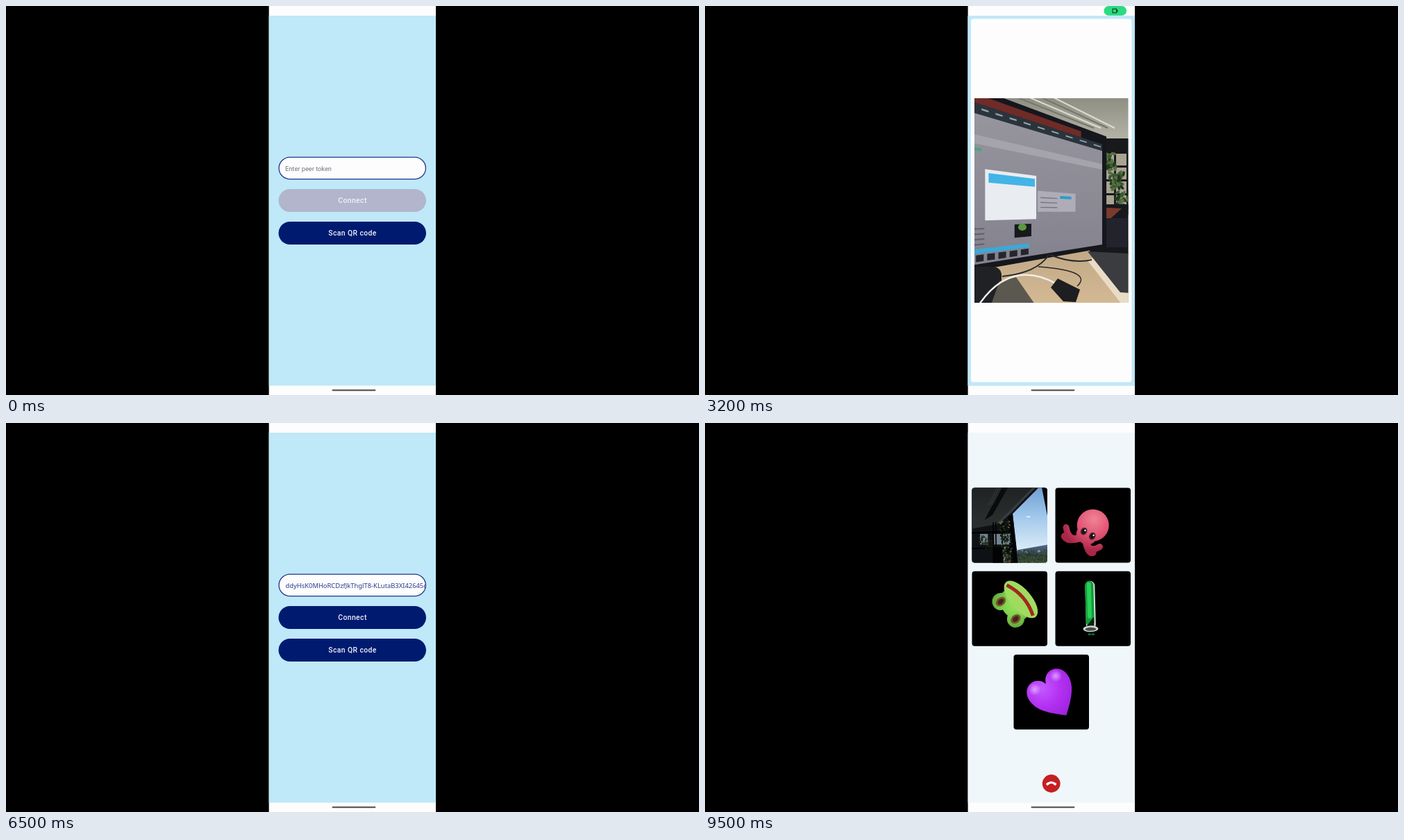
An HTML page with a canvas that plays this animation: 998x561 px, repeating every 9600 ms.

```html
<!DOCTYPE html>
<html lang="en">
<head>
<meta charset="utf-8">
<title>Peer call</title>
<style>
  html, body { margin: 0; width: 100%; height: 100%; overflow: hidden; background: #000; }
  canvas { display: block; }
</style>
</head>
<body>
<canvas id="stage" width="998" height="561"></canvas>
<script>
const c = document.getElementById('stage').getContext('2d');
const LOOP = 9600, LEFT = 378.4, WIDTH = 240.7, NAVY = '#001a70';
const clamp = v => Math.max(0, Math.min(1, v));
const mix = (a, b, k) => a + (b - a) * k;

// ---- drawing helpers ----
function path(pts) {
  c.beginPath();
  for (let i = 0; i < pts.length; i += 2) c.lineTo(pts[i], pts[i + 1]);
}
function poly(color, ...pts) { path(pts); c.fillStyle = color; c.fill(); }
function line(color, width, ...pts) {
  path(pts);
  c.strokeStyle = color; c.lineWidth = width; c.stroke();
}
function curve(color, width, x, y, cx, cy, x2, y2) {
  c.beginPath(); c.moveTo(x, y); c.quadraticCurveTo(cx, cy, x2, y2);
  c.strokeStyle = color; c.lineWidth = width; c.stroke();
}
function rect(color, x, y, w, h, r = 0) {
  c.beginPath(); c.roundRect(x, y, w, h, r);
  c.fillStyle = color; c.fill();
}
function oval(color, x, y, rx, ry = rx, turn = 0) {
  c.beginPath(); c.ellipse(x, y, rx, ry, turn, 0, 7);
  c.fillStyle = color; c.fill();
}
function text(str, x, y, color, font, align = 'left', spacing = 0) {
  c.font = font; c.fillStyle = color; c.textAlign = align;
  c.letterSpacing = spacing + 'px';
  c.fillText(str, x, y);
}
function clipped(x, y, w, h, r, draw) {
  c.save();
  c.beginPath(); c.roundRect(x, y, w, h, r); c.clip();
  draw();
  c.restore();
}
function stops(gradient, colors) {
  colors.forEach((s, i) => gradient.addColorStop(i / (colors.length - 1), s));
  return gradient;
}
const shade = (y, y2, ...colors) => stops(c.createLinearGradient(0, y, 0, y2), colors);
const glow = (x, y, r, ...colors) => stops(c.createRadialGradient(x, y, 0, x, y, r), colors);
function random(seed) {
  return () => (seed = seed * 16807 % 2147483647) / 2147483647;
}
function scatter(seed, n, x, y, w, h, size, colors) {
  const rnd = random(seed);
  for (let i = 0; i < n; i++)
    oval(colors[i % colors.length], x + rnd() * w, y + rnd() * h, size, size / 2, rnd() * 3);
}

// ---- form ----
function button(label, y, color, ink) {
  rect(color, 392.5, y, 212.5, 33, 16.5);
  text(label, 499, y + 20.3, ink, '500 10.4px Roboto, sans-serif', 'center', .4);
}
function form(t) {
  const filled = t >= 4100, ink = '#eef2fa', pressed = '#0a2678';
  const held = (from, to) => t >= from && t < to ? pressed : NAVY;
  rect('#bfe8f8', LEFT, 14, WIDTH, 533.5);
  rect('#fdfdfe', 393.1, 218.1, 211.3, 31.6, 15.8);
  c.strokeStyle = '#23338a'; c.lineWidth = 1.3; c.stroke();
  if (filled) {
    clipped(393, 218, 212, 32, 0, () =>
      text('ddyHsK0MHoRCDzfJkThglT8-KLutaB3XI42645c', 402.5, 238.3, '#2c3a8c', '9.4px "Noto Sans", sans-serif'));
  } else {
    text('Enter peer token', 402, 237.6, '#70747e', '9.25px Roboto, sans-serif');
  }
  button('Connect', 264, filled ? held(6200, 6500) : '#b2b5cb', ink);
  button('Scan QR code', 311, held(2300, 2600), ink);
}

// ---- scanner ----
// A box on the tilted monitor, in fractions of its screen.
function onScreen(color, u, v, w, h) {
  const at = (a, b) => [mix(370, 572, a), mix(mix(149, 209, a), mix(376, 344, a), b)];
  poly(color, ...at(u, v), ...at(u + w, v), ...at(u + w, v + h), ...at(u, v + h));
}
function monitor() {
  onScreen('#15171c', 0, -.17, 1.03, 1.21);
  onScreen('#6f2b27', 0, -.13, .85, .06);
  onScreen('#2a343d', 0, -.07, 1, .07);
  onScreen(shade(150, 370, '#97969f', '#83828e'), 0, 0, 1, 1);
  onScreen('#a5a4ad', 0, .14, 1, .06);
  for (let u = .14; u < .95; u += .1) onScreen('#9aa3ab', u, -.045, .05, .012);
  onScreen('#4aa77c', .08, .225, .06, .02);
  onScreen('#aeadb7', .54, .48, .27, .17);
  onScreen('#2b9cc9', .7, .51, .08, .025);
  for (let v = .53; v < .63; v += .04) onScreen('#74737f', .56, v, .12, .008);
  onScreen('#e9ecf1', .165, .36, .365, .35);
  onScreen('#42b4e6', .19, .385, .33, .065);
  onScreen('#17191d', .375, .745, .12, .1);
  oval('#5d993e', 457, 319, 6, 5);
  for (let v = .76; v < .88; v += .035) onScreen('#62626e', .08, v, .08, .01);
  onScreen('#3aa9d9', 0, .9, .48, .03);
  for (let u = .1; u < .46; u += .08) onScreen('#24262c', u, .94, .055, .045);
}
function desk() {
  rect(shade(133, 200, '#8f8e83', '#b9b8ab'), 370, 115, 260, 330);
  for (let i = 0; i < 4; i++) line(i % 2 ? '#dddccf' : '#77766c', 2, 440 + i * 18, 128, 560 + i * 10, 176);

  // wall shelf with plants
  rect('#17191b', 550, 191, 80, 110);
  for (let y = 213; y < 285; y += 20)
    for (let x = 574; x < 615; x += 18) rect('#a9a392', x, y, 15, 17);
  for (let i = 0; i < 3; i++)
    scatter(9 + i, 30, 573 + i * 10, 212 + i * 28, 20, 24, 4, ['#3a5a30', '#22391f', '#566e42']);

  // table, laptop, monitor
  rect(shade(340, 430, '#bfa684', '#d3b994'), 370, 340, 260, 110);
  poly('#e9dcc6', 550, 366, 600, 430, 630, 430, 570, 360);
  rect('#17181d', 554, 286, 76, 72);
  poly('#7c3a2d', 562, 290, 600, 292, 556, 332);
  rect('#22232c', 578, 306, 30, 42);
  poly('#3b3c40', 551, 354, 630, 358, 630, 415, 598, 413);
  monitor();

  // stand, cables, adapter
  rect('#202124', 360, 376, 67, 60, 12);
  poly('#5b594f', 424, 397, 448, 391, 475, 430, 410, 436);
  curve('#292a2c', 2, 428, 390, 478, 385, 495, 359);
  curve('#292a2c', 2, 497, 359, 530, 372, 557, 366);
  curve('#292a2c', 1.5, 480, 376, 560, 382, 536, 404);
  curve('#f0efea', 2.5, 395, 430, 440, 365, 505, 400);
  poly('#1d1e21', 508, 393, 540, 409, 534, 427, 516, 426, 498, 406);
}
function scanner(t) {
  c.globalAlpha = clamp((t - 2500) / 300);
  rect('#bfe8f8', LEFT, 14, WIDTH, 533.5);
  rect('#fdfdfe', 383, 18.5, 231.5, 524, 4);
  c.globalAlpha = 1;
  if (t < 2900) return;
  clipped(388, 133, 221.5, 295, 0, () => {
    const s = (t - 3200) / 1000;
    c.translate(4 * Math.sin(s * 3), 3 * Math.sin(s * 4));
    desk();
  });
  rect('#2bdb80', 574.5, 0, 32.5, 13.7, 6.8);
  c.strokeStyle = '#123c25'; c.lineWidth = 1.1;
  c.strokeRect(587, 4.2, 5.5, 5.6);
  rect('#123c25', 592.5, 5.5, 2, 3);
}

// ---- call ----
function room() {
  rect('#0f1214', 200, 0, 520, 520);
  poly(shade(34, 200, '#1e2122', '#2b2e2f'), 200, 20, 600, 20, 472, 160, 412, 212, 200, 250);
  poly('#0a0b0c', 440, 20, 470, 20, 385, 172, 350, 195);
  for (let i = 0; i < 3; i++) line('#4b4f50', 1.5, 416 + i * 9, 34, 366 + i * 9, 130);
  line('#393d3f', 9, 592, 28, 468, 152, 412, 207);

  // window
  poly(shade(50, 320, '#6f9fd3', '#a3c9ec', '#d9eaf6'), 472, 168, 597, 42, 672, 420, 498, 392);
  oval('#e6f2fb', 541, 181, 9, 3);
  poly(shade(305, 395, '#52698a', '#2b3d38', '#46572f'), 484, 328, 655, 297, 672, 420, 498, 392);
  for (let i = 0; i < 4; i++)
    scatter(31 + i, 40, 492 + i * 4, 326 + i * 16, 160, 16, 4, i ? ['#1f2d20', '#4c5c36', '#324329'] : ['#94a1a8', '#24352f', '#3a4d45']);
  poly('#76828c', 496, 390, 690, 424, 690, 446, 499, 406);
  line('#c3ccd4', 2, 497, 392, 690, 427);
  poly('#1f2325', 498, 409, 690, 451, 690, 520, 500, 520);
  poly('#07080a', 595, 20, 720, 20, 720, 430, 674, 430);
  poly('#030405', 451, 182, 472, 168, 505, 480, 487, 480);

  // shelves
  for (const x of [330, 390, 428])
    for (const y of [256, 345]) if (x > 400 || y < 300) rect('#71838f', x, y, 34, 46);
  for (let y = 246; y < 400; y += 69) line('#010203', 7, 290, y + 5, 470, y);
  for (const x of [387, 398, 425, 467]) line('#010203', 5, x, 205, x + 5, 475);
  rect('#020304', 385, 315, 40, 160);
  line('#010203', 4, 466, 392, 500, 470);

  // plants
  for (const y of [350, 428]) rect('#5d3425', 440, y, 20, 30, 3);
  for (let i = 0; i < 4; i++) {
    scatter(70 + i, 46, 416 + i * 4, 200 + i * 48, 46, 42, 5, ['#060a07', '#1d2b1a', '#0b130d', i % 2 ? '#2f4026' : '#66734f']);
    scatter(80 + i, 16, 320 + i * 12, 260 + i * 8, 26, 40, 4, ['#10190f', '#24331d']);
  }
  const rnd = random(5);
  for (let i = 0; i < 26; i++) {
    const a = Math.PI * (1 + i / 25), r = 26 + rnd() * 14;
    const dx = r * Math.cos(a), dy = r * Math.sin(a);
    curve(i % 3 ? '#4c5e3d' : '#8d9a73', 1.5, 456, 420, 456 + dx / 2, 408 + dy, 456 + dx, 425 + dy * .7);
  }
}
function octopus() {
  const skin = glow(-3, -8, 46, '#f08495', '#e25474', '#a92646');
  c.rotate(.07);
  c.lineCap = 'round';
  for (const side of [-1, 1])
    for (const [reach, drop, width] of [[28, 22, 9], [23, 34, 11]])
      curve(skin, width, side * 5 - 2, 25, side * 17 - 2, 38, side * reach - 4, drop);
  oval(skin, 0, 0, 23);
  oval(skin, -1, 17, 15, 13);
  for (const x of [-7, 7]) {
    oval('#5c2434', x, 14, 4.6, 5.6);
    oval('#15161c', x, 14, 3, 4);
    oval('#fff', x + 1, 12, 1.2);
  }
}
function frog() {
  const skin = glow(0, 0, 36, '#93e55a', '#7ed04c', '#5ca035');
  c.translate(4, -8);
  c.rotate(3.55);
  oval(skin, 0, 0, 25, 18);
  for (const x of [-16.5, 16.5]) {
    oval(skin, x, -12, 12.5);
    oval('#79562f', x, -12, 6, 8);
    oval('#40251b', x, -12, 3.4, 5);
    oval('#37712a', x * .4, 0, 1.3);
  }
  oval('#a0db60', 0, 12, 33, 15);
  curve('#a02a1d', 5, -29, 10, 0, 22, 29, 10);
}
function tube() {
  c.rotate(-.48);
  c.translate(-4, 0);
  rect('#d3ded7', -6.5, -40, 14, 70, 7);
  rect('#129b39', -6.5, -40, 12, 65, 6);
  rect('#28cf59', -4, -38, 6, 52, 3);
  poly('#0a2113', -6, 25, 5, 12, 5, 26);
  oval('#cfd5d4', 0, 29, 11, 4.5);
  oval('#454e4b', 0, 29.5, 8, 2.5);
  for (const x of [-2, 3]) oval('#176434', x, 37, 2.5, 1.5);
}
function heart() {
  c.rotate(-1.03);
  c.fillStyle = glow(-8, -12, 52, '#c25aff', '#b431f2', '#9b22dc');
  c.beginPath();
  for (const side of [-1, 1]) {
    c.moveTo(0, 40);
    c.bezierCurveTo(side * 18, 25, side * 34, 10, side * 33, -8);
    c.bezierCurveTo(side * 32, -30, side * 6, -33, 0, -14);
  }
  c.fill('nonzero');
  c.fillRect(-.5, -13, 1, 52);
  for (const x of [-18, 18]) oval(glow(x, -16, 9, '#e5b8ffcc', '#e5b8ff00'), x, -16, 9);
}
// Each peer's picture turns around the middle of its tile.
const peers = [octopus, frog, tube, heart];

function call(t) {
  rect('#eff7fb', LEFT, 14, WIDTH, 533.5);
  const k = (t - 8400) / 1100;
  if (t < 7800) {
    if (t < 7400) rect('rgba(0,0,0,.1)', 425, 366, 147.5, 148, 4);
    clipped(385.5, 34, 226.5, 439.5, 5, () => {
      const s = (t - 7200) / 1000;
      c.translate(5 * s, 4 * s);
      room();
    });
  } else {
    for (let i = 0; i < 5; i++) {
      const x = i === 4 ? 444.5 : 384.5 + i % 2 * 120, y = 93.5 + (i >> 1) * 120.2;
      rect('#000', x, y, 108.5, 108, 4);
      clipped(x, y, 108.5, 108, 4, () => {
        if (i) {
          c.translate(x + 54.2, y + 54);
          c.rotate(26 * k * Math.PI / 180);
          peers[i - 1]();
        } else {
          const zoom = .29 + .04 * k;
          c.translate(440 + 3 * k, 127 + 4 * k);
          c.scale(zoom, zoom);
          c.translate(-472, -168);
          room();
        }
      });
    }
  }
  oval('#c51f22', 498.7, 520, 12.9);
  c.lineCap = 'butt';
  curve('#fff', 3, 492.5, 521.4, 498.7, 515.4, 504.9, 521.4);
  for (const side of [-1, 1]) line('#fff', 3.2, 498.7 + side * 6.9, 521.6, 498.7 + side * 4, 519.6);
}

// ---- frame ----
function draw(now) {
  const t = Math.floor(now % LOOP / 100) * 100;
  rect('#000', 0, 0, 998, 561);
  clipped(LEFT, 0, WIDTH, 561, 0, () => {
    rect('#fdfdfe', LEFT, 0, WIDTH, 561);
    if (t >= 7000) call(t);
    const visible = clamp(1 - (t - 7000) / 240);
    if (visible > 0) {
      c.save();
      c.globalAlpha = visible;
      c.translate(-24 * Math.max(0, t - 7000) / 200, 0);
      form(t);
      c.restore();
    }
    if (t >= 2600 && t < 4100) scanner(t);
    rect('#5c5c5c', 469.5, 553, 63, 2.2, 1.1);
  });
}
let start;
function step(now) {
  start ??= now;
  draw(now - start);
  requestAnimationFrame(step);
}
requestAnimationFrame(step);
</script>
</body>
</html>
```
